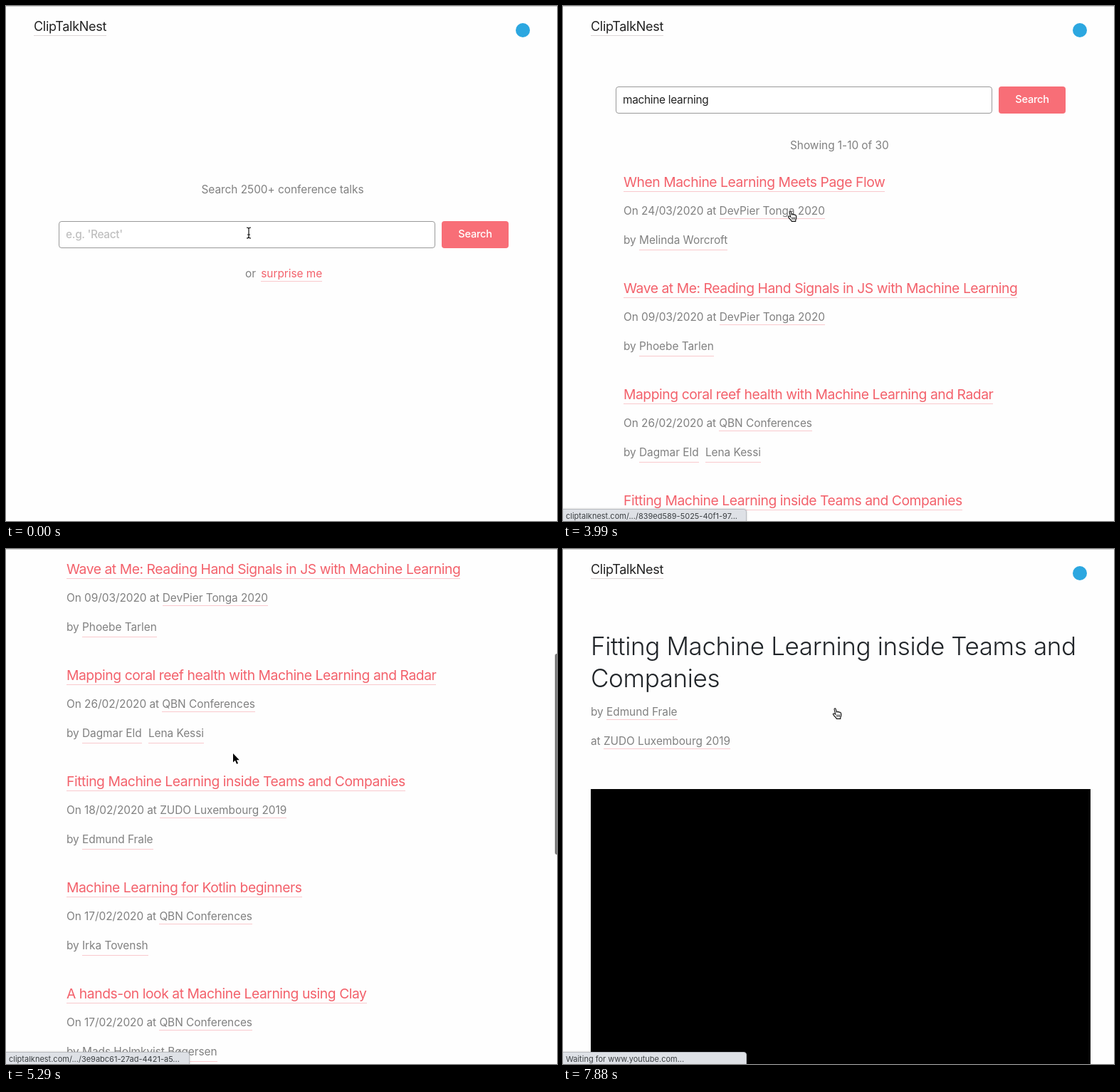
These frames come from a looping animation (774 px wide and 723 px high, 8000 ms). An HTML page:

```html
<!DOCTYPE html>
<html lang="en">
<head>
<meta charset="utf-8">
<title>Talk search</title>
<style>
  html, body { margin: 0; width: 100%; height: 100%; overflow: hidden; background: #fefefe; }
  #stage {
    position: relative; width: 774px; height: 723px; overflow: hidden;
    color: #808080; font: 400 15.4px/20px Inter, "Open Sans", sans-serif;
    letter-spacing: -.03px; white-space: pre;
  }
  :where(#stage div, #stage svg) { position: absolute; left: 0; top: 0; }
  #page { width: 774px; height: 723px; }
  [hidden] { display: none !important; }
  a { display: inline-block; border-bottom: 1px solid #f9c9cd; }
  a + a { margin-left: 5px; }
  .accent { color: #f3616b; }
  .title { font-size: 19.3px; line-height: 26px; letter-spacing: -.44px; }
  .speakers { line-height: 26px; }
  #topline { width: 774px; height: 1px; background: #cfcfcf; }
  #logo { left: 39px; top: 17px; color: #222; font-size: 18px; line-height: 24px; letter-spacing: -.3px; }
  #logo a { border-color: #dcd6d6; }
  #badge { left: 716px; top: 24px; width: 20px; height: 20px; border-radius: 50%; background: #2ca7e0; }
  #form { left: 74px; line-height: 36px; letter-spacing: -.29px; }
  #field { width: 518px; height: 36px; padding-left: 9px; border: 1px solid #999; border-radius: 4px; background: #fff; color: #222; }
  #hint { left: 9px; color: #bfbfbf; font-weight: 500; }
  #caret { position: absolute; top: 10px; width: 1px; height: 17px; background: #222; }
  #button { left: 538px; width: 94px; height: 38px; border-radius: 4px; background: #f86e77; color: #fff; font-size: 14.6px; font-weight: 500; line-height: 37px; text-align: center; }
  #talk h1 { position: absolute; margin: 0; left: 39px; top: 114px; color: #212529; font-size: 35px; font-weight: 350; line-height: 45px; letter-spacing: -.37px; }
  #video { left: 39px; top: 337px; width: 702px; height: 386px; background: #000; }
  #thumb { left: 771px; width: 6px; height: 282px; border-radius: 3px; background: #7d7d7d; }
  #status {
    left: -1px; top: 706px; width: 259px; height: 18px; border: 1px solid #b9bcc1; border-radius: 0 4px 0 0;
    box-sizing: border-box; background: #dee1e6; box-shadow: 0 0 3px #0003;
    color: #3c4043; font-size: 11px; line-height: 18px; letter-spacing: 0; text-indent: 4px;
  }
  #cursor { overflow: visible; }
</style>
</head>
<body>
<div id="stage">
  <div id="page">
    <div id="logo"><a>ClipTalkNest</a></div>
    <div id="badge"></div>
    <div id="home">
      <div style="left:274.5px;top:248px">Search 2500+ conference talks</div>
      <div style="left:336px;top:366px">or <a class="accent" style="margin-left:3px">surprise me</a></div>
    </div>
    <div id="form">
      <div id="field"><div id="hint">e.g. 'React'</div><span id="typed"></span><span id="caret"></span></div>
      <div id="button">Search</div>
    </div>
    <div id="results"><div style="left:319px;top:186px">Showing 1-10 of 30</div></div>
    <div id="talk">
      <h1>Fitting Machine Learning inside Teams and<br>Companies</h1>
      <div style="left:39px;top:219px">by <a>Edmund Frale</a></div>
      <div style="left:39px;top:260px">at <a>ZUDO Luxembourg 2019</a></div>
      <div id="video"></div>
    </div>
  </div>
  <div id="thumb"></div>
  <div id="topline"></div>
  <div id="status"></div>
  <svg id="cursor" width="1" height="1">
    <path id="beam" fill="none" stroke="#111" stroke-width="1.2" d="M-3-7Q0-7 0-5V6Q0 8-3 8M3-7Q0-7 0-5M3 8Q0 8 0 6M-2 3H2"/>
    <path id="arrow" d="M0 0V12.5L2.9 9.8 5 14.8 7 14 4.9 9.2H8.8Z" stroke="#fff" stroke-width="1.4" paint-order="stroke"/>
    <g id="hand" transform="translate(-4.5)" fill="#fff" stroke="#111" stroke-width="1.1">
      <path d="M5.2 9.2 3.6 2.2C3.3.6 5.3.2 5.7 1.8L6.7 5.6C7 4.7 8.6 4.8 8.8 5.9 9.3 5.1 10.7 5.4 10.9 6.5 11.6 5.9 12.8 6.4 12.9 7.5 13.6 9.8 13.4 12 12.3 13.4L12.2 15.4H6.8C6.2 13.4 3.8 12 2.2 9.6 1.2 8 2.9 7.2 5.2 9.2Z"/>
      <path d="M7.4 9.5V12.8M9.3 9.5V12.8M11.2 9.5V12.8" stroke-width=".9"/>
    </g>
  </svg>
</div>
<script>
const LOOP = 8000, ROW_TOP = 247, ROW_PITCH = 149;
const QUERY = 'machine learning';
const SITE = 'cliptalknest.com/.../';

const talks = [
  ['When Machine Learning Meets Page Flow', '24/03/2020', 'DevPier Tonga 2020', 'Melinda Worcroft'],
  ['Wave at Me: Reading Hand Signals in JS with Machine Learning', '09/03/2020', 'DevPier Tonga 2020', 'Phoebe Tarlen'],
  ['Mapping coral reef health with Machine Learning and Radar', '26/02/2020', 'QBN Conferences', 'Dagmar Eld', 'Lena Kessi'],
  ['Fitting Machine Learning inside Teams and Companies', '18/02/2020', 'ZUDO Luxembourg 2019', 'Edmund Frale'],
  ['Machine Learning for Kotlin beginners', '17/02/2020', 'QBN Conferences', 'Irka Tovensh'],
  ['A hands-on look at Machine Learning using Clay', '17/02/2020', 'QBN Conferences', 'Mads Holmkvist Bøgersen'],
  ['Streamlining Deliveries with Machine Learning', '11/02/2020', 'WUX! 2019']
];

const $ = id => document.getElementById(id);
const clamp = (x, low, high) => Math.min(high, Math.max(low, x));
const ramp = (time, from, to) => clamp((time - from) / (to - from), 0, 1);
const glide = (time, from, to) => (1 - Math.cos(Math.PI * ramp(time, from, to))) / 2;
const between = (time, from, to) => time >= from && time < to;
const burst = (time, start, gap, count) => clamp(Math.floor((time - start) / gap) + 1, 0, count);

const line = (y, cls, html) => `<div class="${cls}" style="left:85px;top:${y}px">${html}</div>`;
const link = text => `<a>${text}</a>`;

$('results').innerHTML += talks.map(([title, date, event, ...speakers], i) => {
  const y = ROW_TOP + i * ROW_PITCH;
  return line(y - 13, 'title accent', link(title)) +
    line(y + 31, '', `On ${date} at ${link(event)}`) +
    (speakers.length ? line(y + 69, 'speakers', 'by ' + speakers.map(link).join(' ')) : '');
}).join('');

function drawForm(t) {
  const typed = burst(t, 830, 87, 9) + burst(t, 1650, 1, 1) + burst(t, 1890, 115, 3) + burst(t, 2540, 55, 3);
  $('form').style.top = (t < 2940 ? 302 : 113) + 'px';
  $('typed').textContent = QUERY.slice(0, typed);
  $('hint').hidden = typed > 0;
  $('caret').hidden = !between(t, 180, 660) && !between(t, 830, 2940);
}

function drawPage(t) {
  const talkOpen = t >= 7470;
  $('home').hidden = t >= 2940;
  $('form').hidden = talkOpen;
  $('results').hidden = !between(t, 3000, 7470);
  $('talk').hidden = !talkOpen;
  $('video').hidden = t < 7820;

  const scroll = talkOpen ? 0 :
    257 * glide(t, 3990, 4570) + 111 * glide(t, 4750, 5110) + 99 * glide(t, 5520, 5930);
  $('page').style.transform = `translateY(${-Math.round(scroll)}px)`;
  $('thumb').style.top = 2.5 + scroll * .394 + 'px';
  $('thumb').style.opacity = ramp(t, 3990, 4050) - ramp(t, 6400, 6640);
}

function drawStatus(t) {
  $('status').textContent =
    t < 4420 ? SITE + '839ed589-5025-40f1-97...' :
    t < 6170 ? SITE + '3e9abc61-27ad-4421-a5...' :
    t < 7820 ? SITE + '7c41e0d2-93be-4f08-b6...' : 'Waiting for www.youtube.com...';
  $('status').style.opacity = ramp(t, 3800, 3950) - ramp(t, 5530, 5700) +
    ramp(t, 6770, 6930) - ramp(t, 7480, 7640) + ramp(t, 7820, 7880);
}

function drawCursor(t) {
  const toList = glide(t, 3410, 3770), nudge = glide(t, 5930, 6170), toTalk = glide(t, 6170, 6640);
  const x = 341 - 22 * toList + 63 * toTalk;
  const y = 318 - 31 * toList - 5 * nudge - 59 * toTalk;
  const shape = t < 2880 ? 'beam' : between(t, 3650, 5290) || t >= 6520 ? 'hand' : 'arrow';
  for (const id of ['beam', 'arrow', 'hand']) $(id).style.display = id === shape ? '' : 'none';
  $('cursor').style.transform = `translate(${x}px, ${y}px)`;
}

const began = performance.now();
function tick() {
  const t = (performance.now() - began) % LOOP;
  for (const draw of [drawForm, drawPage, drawStatus, drawCursor]) draw(t);
  requestAnimationFrame(tick);
}
tick();
</script>
</body>
</html>
```
